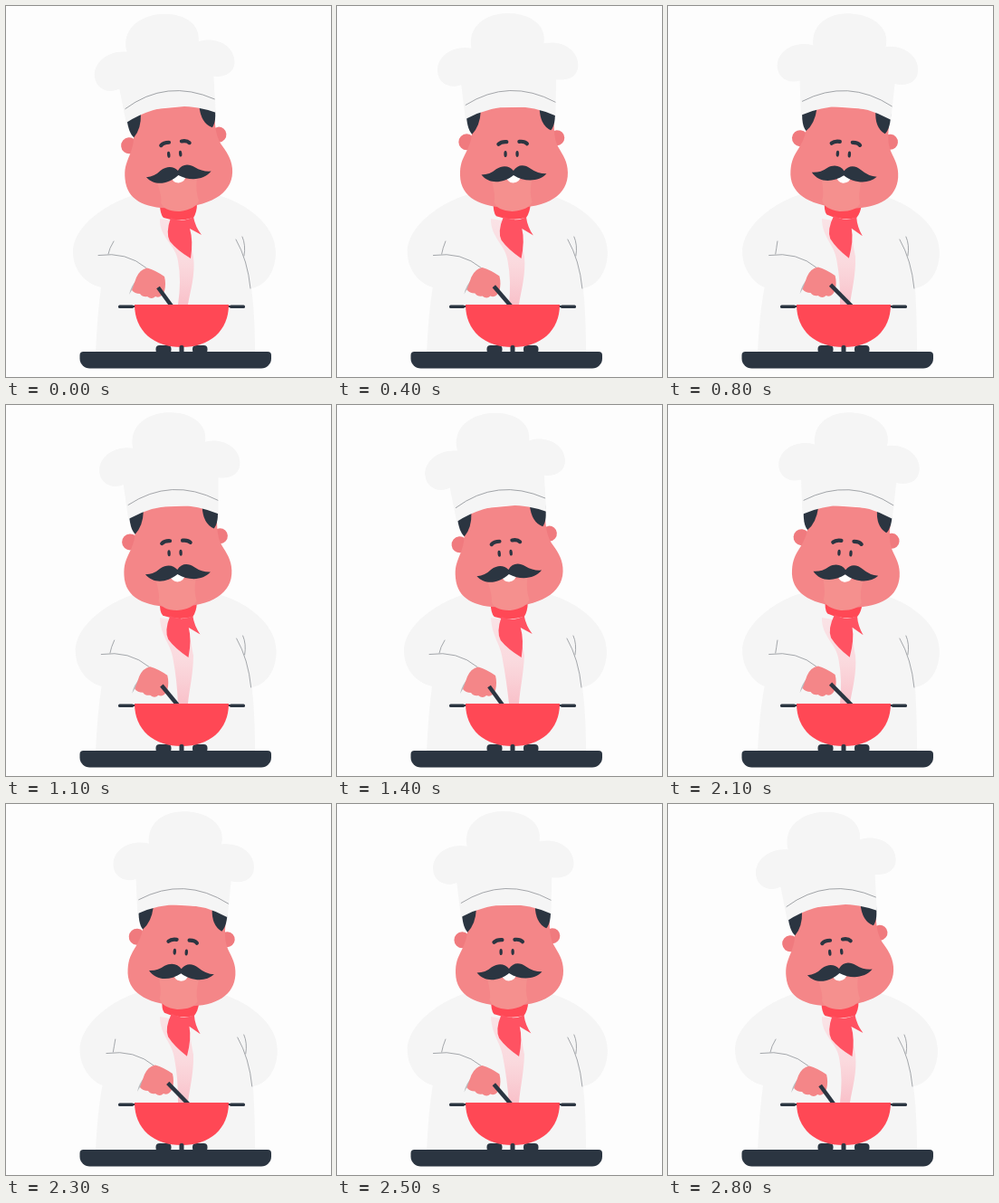
An HTML page with a canvas for the animation above (2.9 s loop, 359 px wide and 410 px high).

```html
<!DOCTYPE html>
<html lang="en">
<head>
<meta charset="utf-8">
<title>Chef stirring a pan</title>
<style>
  html, body { margin: 0; width: 100%; height: 100%; overflow: hidden; background: #fdfdfd; }
  canvas { display: block; }
</style>
</head>
<body>
<canvas id="stage" width="359" height="410"></canvas>
<script>
const ctx = document.getElementById('stage').getContext('2d');
const LOOP = 2900, SWAY = 1450, STEP = 100;
const COLOR = {
  back: '#fdfdfd', cloth: '#f5f5f5', line: '#8f9297', dark: '#2b3541',
  skin: '#f48688', chin: '#f5908e', ear: '#f07a7e', red: '#ff4855', scarf: '#ff5262'
};
const STEAM_KEYS = [[0, 1], [400, .8], [800, .5], [1400, 0], [2100, .8], [2500, .1], [2800, .9], [2900, 1]];

function fill(path, color) {
  ctx.fillStyle = color;
  ctx.fill(new Path2D(path));
}

function stroke(path, color = COLOR.line, width = .8, cap = 'round') {
  ctx.strokeStyle = color;
  ctx.lineWidth = width;
  ctx.lineCap = cap;
  ctx.stroke(new Path2D(path));
}

function ellipse(x, y, rx, ry, color, turn = 0) {
  ctx.fillStyle = color;
  ctx.beginPath();
  ctx.ellipse(x, y, rx, ry, turn, 0, Math.PI * 2);
  ctx.fill();
}

function box(x, y, w, h, radii, color) {
  ctx.fillStyle = color;
  ctx.beginPath();
  ctx.roundRect(x, y, w, h, radii);
  ctx.fill();
}

// Runs draw() turned by angle around a pivot that is itself moved by dx.
function turned(x, y, angle, dx, draw) {
  ctx.save();
  ctx.translate(x + dx, y);
  ctx.rotate(angle);
  ctx.translate(-x, -y);
  draw();
  ctx.restore();
}

function keyed(keys, t) {
  const i = Math.max(1, keys.findIndex(k => k[0] >= t));
  const [t0, a] = keys[i - 1], [t1, b] = keys[i];
  const u = (t - t0) / (t1 - t0);
  return a + (b - a) * u * u * (3 - 2 * u);
}

function drawBody(lean) {
  const l = 8.5 * lean, r = 2 * lean, a = 10 * lean;
  fill(`M165 205 C${128 + l * .5} 206 ${74 + l} 238 ${74 + l} 272
    C${74 + l} 292 ${88 + l} 307 ${105 + l * .2} 311 Q101 340 99 383
    H275 Q275 340 ${271 + r} 312 C${288 + r} 309 ${298 + r} 292 ${298 + r} 272
    C${298 + r} 238 ${256 + r} 210 215 205 Z`, COLOR.cloth);
  stroke(`M${102 + a} 275.5 Q${133 + a} 271 ${155 + a} 289.5`);
  stroke(`M${113 + a * .6} 274 Q${114 + a * .6} 268 ${119 + a * .2} 260`);
  stroke(`M${254 + r} 258 Q${267 + r} 281 ${270 + r} 312`);
  stroke(`M${261 + r} 255 Q${265 + r} 264 ${263 + r} 276`);
}

function drawSteam(wave) {
  const w = 7 * wave;
  const shade = ctx.createLinearGradient(0, 235, 0, 330);
  shade.addColorStop(0, 'rgba(255,205,212,.45)');
  shade.addColorStop(.5, 'rgba(252,209,215,.75)');
  shade.addColorStop(1, 'rgba(249,190,199,.95)');
  fill(`M170 235 C${171 - w * .3} 256 ${181 + w} 264 ${183 + w} 282
    Q${187 + w} 303 190 330 H201 C${202 + w * .2} 315 ${206 + w * .5} 297 207 277
    L200 240 Z`, shade);
}

function drawScarf() {
  fill(`M170 218 Q170 230 174 234 Q190 239 207 234 Q211 228 211 218 Z`, COLOR.red);
  fill(`M182 234 Q176 251 181 260 Q189 270 204 279 Q207 259 203 246
    L216 253 Q209 244 207 233 Q195 240 182 234 Z`, COLOR.scarf);
}

function drawHead() {
  ellipse(142, 149.5, 9, 9, COLOR.ear);
  ellipse(241.5, 146.5, 8.5, 8.5, COLOR.ear);
  fill(`M147 112 C149 138 149 145 142 159 C136 170 134 175 134 186
    C134 211 156 222 190 223 C230 224 253 210 253 185
    C253 173 248 166 243 157 C237 145 239 132 239 112 Z`, COLOR.skin);
  fill('M169 193 Q173 210 171 216 Q174 226 191 227 Q209 226 213 217 Q210 207 213 193 Z', COLOR.chin);

  fill('M142 116 H158 Q157 132 148 141 Q142 135 142 116 Z', COLOR.dark);
  fill('M223 113 H240 Q241 132 235 138 Q223 132 223 113 Z', COLOR.dark);

  fill('M184 187 H202 Q200 195.5 192.5 195.5 Q186 195 184 187 Z', '#fff');
  fill(`M157.5 186 Q167 186 174 180 C182 175 189 177 193 182
    C198 175 205 175 212 180 Q220 186 229.5 186
    C221 195 205 195 193 187 C181 196 166 197 157.5 186 Z`, COLOR.dark);

  ellipse(184.5, 163.5, 1.7, 3.5, COLOR.dark);
  ellipse(197.5, 163.5, 1.7, 3.5, COLOR.dark);
  stroke('M177 152.5 Q180 149.5 186 150', COLOR.dark, 4.2);
  stroke('M200 150 Q206 149.5 208.5 152.5', COLOR.dark, 4.2);

  fill(`M141 124 L137 86 C125 91 111 84 111 70 C111 54 129 42 149 46
    C145 22 165 8 189 8 C214 8 233 22 229 42
    C249 38 266.5 50 266.5 66 C266.5 80 254 84 242 82
    L240.5 122 Q190 99 141 124 Z`, COLOR.cloth);
  stroke('M141.5 108.5 Q190 79 240.5 107');
}

function drawHand(lean) {
  ctx.save();
  ctx.translate(10 * lean, -lean);
  fill('M136 319 Q138 309 145 302 L147 306 Q140 311 136 319 Z', '#b9bcbf');
  fill(`M144 300 Q148 291 156 289.5 Q165 292 175 299 Q177 307 175 315
    Q171 324 165 321 Q161 325 156 321 Q151 322 148 318 Q142 318 139 314 Z`, COLOR.skin);
  ctx.restore();
  stroke(`M${168 + 12 * lean} ${311 - 3 * lean} L${184 + 21 * lean} 333`, COLOR.dark, 4.5, 'butt');
}

function drawStove() {
  box(124, 330.5, 17, 3.5, 1.5, COLOR.dark);
  box(247, 330.5, 17, 3.5, 1.5, COLOR.dark);
  stroke('M138 332 H250', COLOR.dark, 1.8);
  box(165.5, 375, 17, 9, 4, COLOR.dark);
  box(206, 375, 16.5, 9, 4, COLOR.dark);
  fill('M142 330 H246 C246 359 225 377 194 377 C163 377 142 359 142 330 Z', COLOR.red);
  box(191.5, 375, 5, 9, 2, COLOR.dark);
  box(81.5, 382, 211.5, 18.5, [4, 4, 11, 11], COLOR.dark);
}

function draw(t) {
  const phase = t / SWAY * Math.PI * 2;
  const lean = Math.pow((1 - Math.cos(phase)) / 2, 1.5);
  const drift = 2.5 * Math.sin(phase);

  ctx.fillStyle = COLOR.back;
  ctx.fillRect(0, 0, 359, 410);
  drawBody(lean);
  drawSteam(keyed(STEAM_KEYS, t));
  turned(205, 247, .12 * lean, drift * .5, drawScarf);
  turned(191, 215, -.093 + .171 * lean, drift, drawHead);
  drawHand(lean);
  drawStove();
}

function tick() {
  const t = performance.now() % LOOP;
  draw(Math.floor(t / STEP) * STEP);
  requestAnimationFrame(tick);
}
tick();
</script>
</body>
</html>
```
